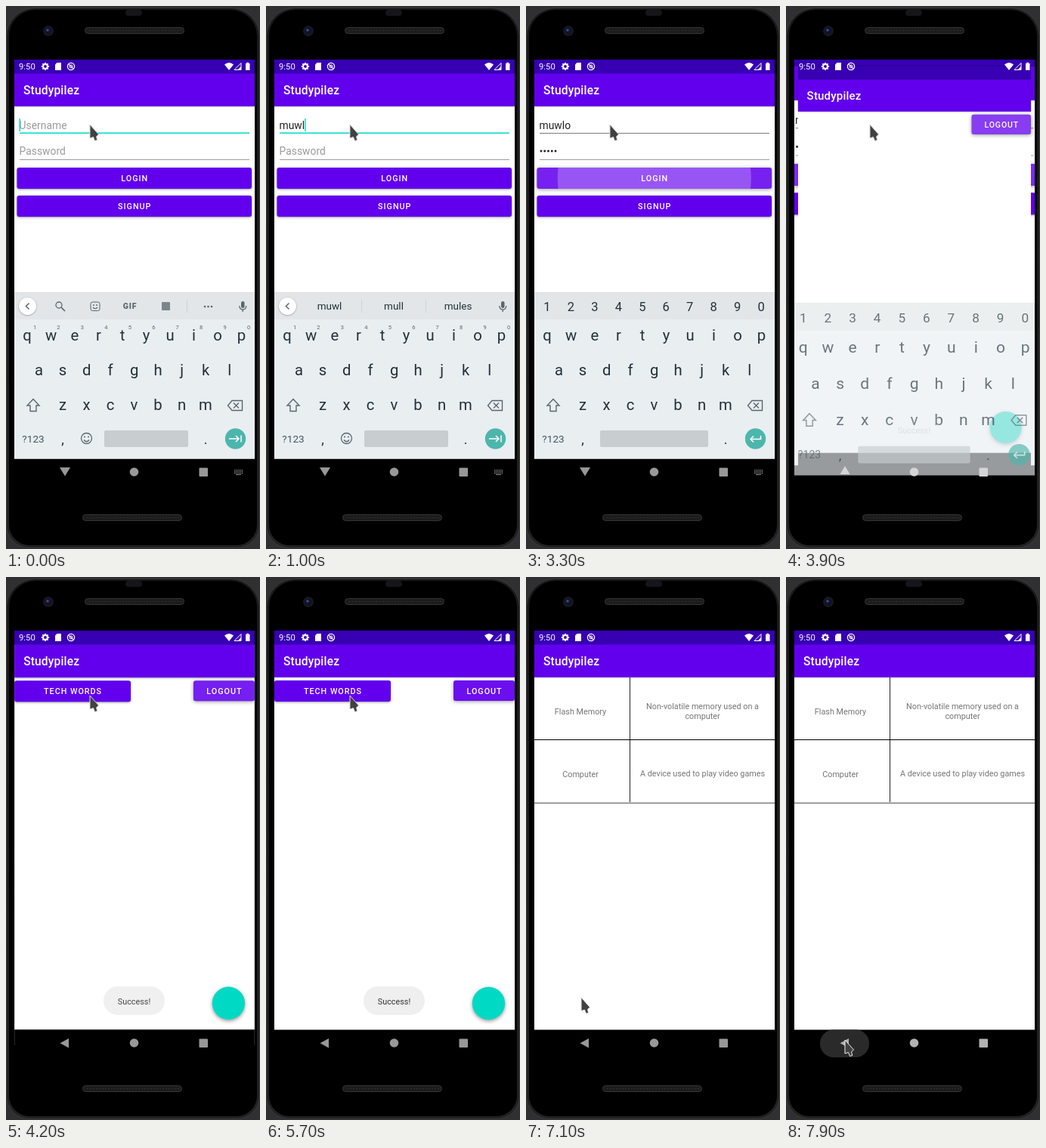
An HTML page with a canvas that plays this animation: 336 px wide and 719 px high, repeating every 8 s.

```html
<!DOCTYPE html>
<html lang="en">
<head>
<meta charset="utf-8">
<title>Login demo</title>
<style>
html, body { margin: 0; width: 336px; height: 719px; overflow: hidden; background: #000; }
canvas { display: block; }
</style>
</head>
<body>
<canvas id="stage" width="336" height="719"></canvas>
<script>
const ctx = document.getElementById('stage').getContext('2d');
const PURPLE = '#6200ee', DARK_PURPLE = '#3700b3', TEAL = '#03dac5', KEY = '#22313a', ICON = '#5a676e';
const APP = 'Studypilez', USER = 'muwlo';
const CENTER = [170, 353.5];

// ---- helpers ----
function rect(x, y, right, bottom, fill, radius = 0, stroke) {
  ctx.beginPath();
  ctx.roundRect(x, y, right - x, bottom - y, radius);
  if (fill) { ctx.fillStyle = fill; ctx.fill(); }
  if (stroke) { ctx.strokeStyle = stroke; ctx.lineWidth = 1; ctx.stroke(); }
}
function circle(x, y, r, fill, stroke, width = 1.3) {
  ctx.beginPath();
  ctx.arc(x, y, r, 0, 7);
  if (fill) { ctx.fillStyle = fill; ctx.fill(); }
  if (stroke) { ctx.strokeStyle = stroke; ctx.lineWidth = width; ctx.stroke(); }
}
function path(d, fill, stroke, width = 1.4, x = 0, y = 0) {
  const p = new Path2D(d);
  ctx.save();
  ctx.translate(x, y);
  if (fill) { ctx.fillStyle = fill; ctx.fill(p); }
  if (stroke) { ctx.strokeStyle = stroke; ctx.lineWidth = width; ctx.stroke(p); }
  ctx.restore();
}
function text(s, x, y, size, color, align = 'center', weight = 400, spacing = 0) {
  ctx.font = `${weight} ${size}px Roboto, sans-serif`;
  ctx.letterSpacing = spacing + 'px';
  ctx.textAlign = align;
  ctx.fillStyle = color;
  ctx.fillText(s, x, y);
}
function textWidth(s, size) {
  ctx.font = `400 ${size}px Roboto, sans-serif`;
  ctx.letterSpacing = '0px';
  return ctx.measureText(s).width;
}
function shadow(blur, y, draw) {
  ctx.save();
  ctx.shadowColor = 'rgba(0,0,0,.4)';
  ctx.shadowBlur = blur;
  ctx.shadowOffsetY = y;
  draw();
  ctx.restore();
}
function layer(draw, { scale = 1, alpha = 1, dy = 0 }) {
  ctx.save();
  ctx.globalAlpha = alpha;
  ctx.translate(CENTER[0], CENTER[1] + dy);
  ctx.scale(scale, scale);
  ctx.translate(-CENTER[0], -CENTER[1]);
  draw();
  ctx.restore();
}
// Value of the last [time, value] pair already reached.
const at = (t, steps) => steps.reduce((value, [time, next]) => t >= time ? next : value, 0);
const typed = (t, times) => times.filter(time => t >= time).length;

function button(label, x, y, right, bottom, light = 0, ripple) {
  shadow(light ? 5 : 3, 1, () => rect(x, y, right, bottom, PURPLE, 3));
  if (light) rect(x, y, right, bottom, `rgba(255,255,255,${light})`, 3);
  if (ripple) {
    ctx.save();
    rect(x, y, right, bottom, null, 3);
    ctx.clip();
    circle((x + right) / 2, (y + bottom) / 2, ripple, 'rgba(255,255,255,.24)');
    ctx.restore();
  }
  text(label, (x + right) / 2 + .5, Math.round((y + bottom) / 2 + 4), 10.8, '#fff', 'center', 500, .97);
}

// ---- phone ----
function body() {
  rect(0, 0, 336, 719, '#303032');
  const bezel = ctx.createLinearGradient(0, 0, 0, 719);
  bezel.addColorStop(0, '#1a1a1b');
  bezel.addColorStop(1, '#222223');
  rect(.5, 2.5, 335.5, 717.5, bezel, [38, 38, 30, 30], '#3a3a3b');
  rect(4, 5, 332, 714, '#000', [35, 35, 27, 27]);
  rect(158, 5, 180, 13, '#15151b', 4);
  circle(56, 33, 7, '#17181c');
  circle(56, 33, 4, '#0d1230');
  circle(55, 32, 1.8, '#3b4b94');
  for (const [x, y] of [[104, 28], [101, 673]]) {
    rect(x + .5, y + .5, x + 131.5, y + 8.5, '#1c1c1c', 4, '#343434');
    for (let i = 6; i < 128; i += 4) rect(x + i, y + 4, x + i + 2, y + 5, '#303030');
  }
}
function statusBar() {
  text('9:50', 17, 84, 11.3, '#fff', 'left');
  circle(52, 80, 2.9, null, '#fff', 2);
  for (let i = 0; i < 8; i++) {
    const a = i * Math.PI / 4;
    circle(52 + 4.3 * Math.cos(a), 80 + 4.3 * Math.sin(a), 1, '#fff');
  }
  path('M67.5 75H73V85H65V77.5Z', '#fff');
  circle(86, 80, 4.6, null, '#fff');
  circle(86, 80, 2, null, '#fff', 1);
  path('M82.8 76.8L89.2 83.2', null, '#fff', 1.2);
  path('M289 77.5Q295 72.5 301 77.5L295 85Z', '#fff');
  path('M311 75.5V84.5H302Z', null, '#fff', 1);
  path('M311 80V84.5H306.5Z', '#fff');
  path('M317 76H318.3V74.8H321V76H322.5V85H317Z', '#fff');
}
function windowBase() {
  rect(11, 71, 329, 636, '#000');
  rect(11, 89, 329, 599.5, '#fff');
  shadow(2, .5, () => rect(11, 89, 329, 132.8, PURPLE));
  rect(11, 71, 329, 89.5, DARK_PURPLE);
  text(APP, 23, 117, 15.6, '#fff', 'left', 500, .15);
}
function navBar(t) {
  const color = t >= 7800 ? '#b2b2b2' : '#989898';
  const ripple = at(t, [[7700, .35], [7800, .7], [7900, 1]]);
  if (ripple) {
    ctx.globalAlpha = ripple;
    rect(45, 599.5, 110, 636, '#2a2a2a', 18);
    ctx.globalAlpha = 1;
  }
  const turning = t >= 3900 && t < 4000, tint = turning ? '#d5d5d5' : color;
  if (turning) path('M71.5 620H84.5L78 609Z', tint);
  else if (t < 3900) path('M71 611H85L78 622.5Z', tint);
  else path('M83 611V623.5L71.5 617.2Z', tint);
  circle(169.5, 617, 5.8, tint);
  rect(255.5, 611.5, 267, 623, tint, 1);
  if (t >= 3900) return;
  for (let y = 614; y < 619; y += 2)
    for (let x = 302; x < 313; x += 2) rect(x, y, x + 1.2, y + 1.2, '#888');
  rect(304, 620, 311, 621, '#888');
}

// ---- keyboard ----
function toolbar() {
  circle(70, 396, 4, null, ICON);
  path('M73 399L78 404', null, ICON, 1.7);
  rect(112, 392, 124, 403.5, null, 2.5, ICON);
  circle(116, 396, .9, ICON);
  circle(120, 396, .9, ICON);
  path('M115 399Q118 402.5 121 399', null, ICON, 1.2);
  text('GIF', 164, 401, 10.5, ICON, 'center', 900, .8);
  rect(206, 392, 217, 403, '#7b858a', 1);
  rect(239, 389, 240, 406, '#cfd3d5');
  for (const x of [263, 267.5, 272]) circle(x, 398, 1.3, ICON);
}
function suggestions(count) {
  const words = [['m', 'me', 'my'], ['mu', 'much', 'must'], ['muw', 'mud', 'muse'],
    ['muwl', 'mull', 'mules'], [USER, 'mellow', 'mallow']][count - 1];
  words.forEach((word, i) => text(word, 84 + i * 85, 402, 13.5, KEY));
  for (const x of [126, 211]) rect(x, 389, x + 1, 406, '#cfd3d5');
}
function keyboard(t) {
  const numbers = t >= 1300;
  const columnX = i => 28 + i * 31.45;
  rect(11, 379, 329, 380, '#dcdfe1');
  rect(11, 380, 329, 415, '#e2e6e8');
  rect(11, 415, 329, 599.5, '#e9eef1');
  if (numbers) [...'1234567890'].forEach((d, i) => text(d, columnX(i), 404, 16.5, KEY));
  else {
    shadow(2, .5, () => circle(28.5, 397.5, 11.5, '#fff'));
    path('M30.5 393.5L26.5 397.5L30.5 401.5', null, ICON, 1.5);
    const count = typed(t, [300, 500, 700, 1000, 1100]);
    count ? suggestions(count) : toolbar();
    rect(311, 391, 315.5, 400, ICON, 2.2);
    path('M308.7 397Q309 402 313.2 402T317.8 397M313.2 402V405', null, ICON, 1.3);
    [...'1234567890'].forEach((d, i) => text(d, columnX(i) + 10, 428, 7.5, ICON));
  }
  [['qwertyuiop', 28, 443], ['asdfghjkl', 43.6, 489], ['zxcvbnm', 75, 535]].forEach(([keys, x, y]) =>
    [...keys].forEach((k, i) => text(k, x + i * 31.5, y, 20.3, KEY)));
  path('M36 520.5L44 529H40V536.5H32V529H28Z', null, ICON);
  path('M299 522.5H312.5V535.5H299L293.5 529ZM301 525.5L308 532.5M308 525.5L301 532.5', null, ICON);
  text('?123', 36, 578, 13.6, '#455660');
  text(',', 75, 580, 18, KEY);
  text('.', 264, 580, 18, KEY);
  if (!numbers) {
    circle(106.5, 572.5, 7, null, ICON);
    circle(104, 570.5, 1, ICON);
    circle(109, 570.5, 1, ICON);
    path('M103 574.5Q106.5 579 110 574.5', null, ICON, 1.3);
  }
  rect(numbers ? 98 : 130, 562, 241, 584, '#c8cdd0', 2);
  circle(303.5, 573, 13.7, '#4db6ac');
  path(t < 2900 ? 'M295 573H308M304 569L308 573L304 577M311 568.5V577.5'
    : 'M310.5 569V573.5H297.5M301 569.5L297 573.5L301 577.5', null, '#fff', 1.5);
}

// ---- screens ----
function loginScreen(t) {
  windowBase();
  const name = USER.slice(0, typed(t, [300, 500, 700, 1000, 1100]));
  const count = typed(t, [1900, 2000, 2200, 2400, 2600]);
  const onName = t < 1300, onPassword = !onName && t < 2900;
  text(name || 'Username', 17.5, 162.5, 13.9, name ? '#222' : '#9b9b9b', 'left');
  if (onName) {
    rect(18, 167.5, 322, 169, TEAL);
    const x = 17.5 + textWidth(name, 13.9);
    rect(x, 149, x + 1.4, 166, TEAL);
  } else rect(18, 168, 322, 169, '#7c7c7c');

  if (!count) text('Password', 17.5, 197, 13.9, '#9b9b9b', 'left');
  const plain = onPassword && count ? USER[count - 1] : '';
  const dots = plain ? count - 1 : count;
  for (let i = 0; i < dots; i++) circle(20 + i * 4.75, 192, 1.5, '#222');
  text(plain, 17.5 + dots * 4.75, 197, 13.9, '#222', 'left');
  if (onPassword && (t < 1800 || count)) {
    const x = 17.5 + dots * 4.75 + textWidth(plain, 13.9);
    rect(x, 184, x + 1.4, 200, TEAL);
  }
  rect(18, 203, 322, 204, onPassword ? '#6fa8a2' : '#9c9c9c');
  const light = at(t, [[2900, .1], [3000, .13], [3500, .22], [3600, .19], [3700, .17]]);
  const ripple = at(t, [[3300, 128], [3400, 170], [3500, 0]]);
  button('LOGIN', 14.5, 214, 325, 242, light, ripple);
  button('SIGNUP', 14.5, 251, 325, 279);
}
function homeScreen(t) {
  windowBase();
  if (t >= 4100) button('TECH WORDS', 11, 137, 165, 165, 0, at(t, [[5800, 50], [5900, 85]]));
  button('LOGOUT', 248, 137, 329, 164, at(t, [[3900, .24], [4000, .18], [4100, .12], [4300, .06]]));
  shadow(5, 2, () => circle(294.5, 564.5, 21.7, '#00dac5'));
}
function cardsScreen() {
  windowBase();
  const cell = (s, x, y) => text(s, x, y, 10.8, '#757575');
  cell('Flash Memory', 72, 182);
  cell('Non-volatile memory used on a', 233.5, 175);
  cell('computer', 233.5, 187.5);
  cell('Computer', 72, 265);
  cell('A device used to play video games', 233.5, 264);
  rect(137, 133, 138, 298, '#222');
  rect(11, 215, 329, 216, '#000');
  rect(11, 298.7, 329, 299.7, '#444');
}
function toast(t) {
  ctx.globalAlpha = at(t, [[3900, .1], [4000, .4], [4100, .7], [4200, .9], [4300, 1], [6100, .5], [6200, .2], [6300, 0]]);
  rect(129, 542, 210, 580, '#efefef', 19);
  text('Success!', 169.5, 565.5, 10.8, '#333');
  ctx.globalAlpha = 1;
}
function transition(p, from, to) {
  layer(from, { scale: 1.036 + .05 * p });
  layer(to, { scale: .9686 + .0314 * p });
}

function pointer(t) {
  const stops = [[6400, 111, 157], [6700, 105, 265], [7000, 83, 485], [7300, 53, 700],
    [7400, 58, 690], [7600, 74, 640], [7800, 78, 613], [8000, 78, 613]];
  let x = 111, y = 157;
  for (let i = 1; i < stops.length; i++) {
    const [t0, x0, y0] = stops[i - 1], [t1, x1, y1] = stops[i];
    if (t < t0 || t >= t1) continue;
    const p = (t - t0) / (t1 - t0);
    x = x0 + (x1 - x0) * p;
    y = y0 + (y1 - y0) * p;
  }
  path('M0 0V18L4.5 16.5L6.5 21.5L9.8 20.5L8.5 16L11.5 13Z', '#414141', t >= 6500 ? '#eee' : '#d6d6d6', 1, x, y);
}

function screen(t) {
  const login = () => loginScreen(t), home = () => homeScreen(t);
  if (t < 3900) { login(); keyboard(t); }
  else if (t < 4300) {
    const step = (t - 3900) / 100;
    transition([0, .55, .85, .97][step], login, home);
    if (step < 2) layer(() => keyboard(t), { scale: 1.037, alpha: step ? .25 : .65, dy: step ? 60 : 13 });
  }
  else if (t < 5900) home();
  else if (t < 6100) transition(t < 6000 ? 0 : .75, home, cardsScreen);
  else cardsScreen();
}

function frame(now) {
  const t = Math.floor(now % 8000 / 100) * 100;
  body();
  ctx.save();
  ctx.beginPath();
  ctx.rect(11, 71, 318, 565);
  ctx.clip();
  screen(t);
  statusBar();
  toast(t);
  navBar(t);
  ctx.restore();
  pointer(t);
  requestAnimationFrame(frame);
}
requestAnimationFrame(frame);
</script>
</body>
</html>
```
